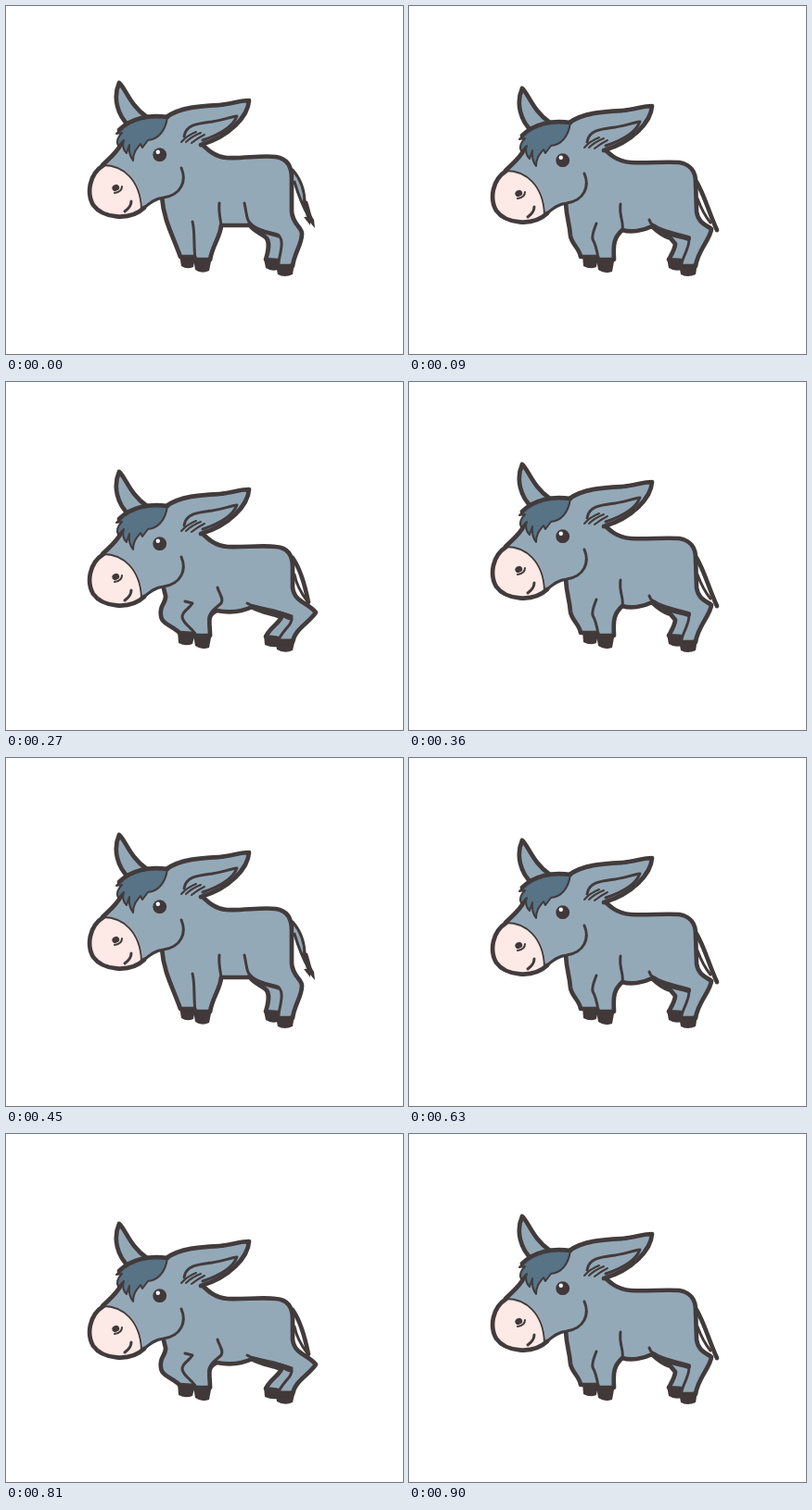
An HTML page for the animation above (0.99 s loop, 428 by 376 pixels).

```html
<!DOCTYPE html>
<html lang="en">
<head>
<meta charset="utf-8">
<title>Donkey</title>
<style>
  html, body { margin: 0; width: 100%; height: 100%; overflow: hidden; background: #fff; }
  svg { display: block; width: 428px; height: 376px; }

  .line { fill: none; stroke: #423b3c; stroke-width: 4.7; stroke-linecap: round; stroke-linejoin: round; }
  .skin { fill: #94a9b8; }
  .thin { stroke-width: 3; }
  .hair { stroke-width: 2; }
  .thick { stroke-width: 6; }
  .dark { fill: #403839; }

  .stand, .dip, .crouch, .head, .open, .shut { animation: 990ms step-end infinite; }
  .stand { animation-name: stand; }
  .dip { animation-name: dip; }
  .crouch { animation-name: crouch; }
  .head { animation-name: nod; }
  .open { animation-name: open; }
  .shut { animation-name: shut; }

  /* Eleven beats of 90 ms */
  @keyframes stand {
    0%, 45.4545%, 100% { visibility: visible; }
    9.0909%, 63.6364% { visibility: hidden; }
  }
  @keyframes dip {
    0%, 18.1818%, 45.4545%, 72.7273%, 100% { visibility: hidden; }
    9.0909%, 36.3636%, 63.6364%, 90.9091% { visibility: visible; }
  }
  @keyframes crouch {
    0%, 36.3636%, 90.9091%, 100% { visibility: hidden; }
    18.1818%, 72.7273% { visibility: visible; }
  }
  @keyframes nod {
    0%, 45.4545%, 100% { transform: translateY(0); }
    9.0909%, 36.3636%, 63.6364%, 90.9091% { transform: translateY(6px); }
    18.1818%, 72.7273% { transform: translateY(14px); }
  }
  @keyframes open {
    0%, 27.2727%, 81.8182%, 100% { visibility: visible; }
    18.1818%, 72.7273% { visibility: hidden; }
  }
  @keyframes shut {
    0%, 27.2727%, 81.8182%, 100% { visibility: hidden; }
    18.1818%, 72.7273% { visibility: visible; }
  }
</style>
</head>
<body>
<svg viewBox="0 0 428 376">
  <g class="stand">
    <path class="line thin skin" d="M309 177C316 185 322 197 322 213L326 227C321 218 316 207 311 190"/>
    <path class="dark" d="M320 209L325 211C328 219 328 225 332 231L333 240L328 234L328 237L321 228L324 228Z"/>
    <path class="line skin" d="M208 146C216 154 224 163 238 164C256 165 275 161 291 163C304 165 308 174 308 186L308 222C309 236 319 239 319 246C319 258 311 266 309 281L293 281L293 275L280 274C283 264 285 255 280 250C275 246 267 243 263 237L232 237C231 250 223 257 220 274L204 274L203 271L188 271C180 248 170 232 168 206"/>
    <path class="line thin" d="M230 213C229 222 231 229 232 237M201 233C204 245 202 258 204 273M257 213C260 226 259 233 266 237C275 245 286 244 294 248C300 254 296 265 293 281"/>
    <path class="line" d="M262 236C270 243 283 245 293 248"/>
    <path class="dark" d="M187 269Q195 273 204 270L202 282Q195 285 189 281ZM202 273Q212 274 222 271L219 286Q211 290 204 285ZM278 273Q287 275 294 273L293 285Q286 287 280 283ZM291 280Q301 280 311 278L309 290Q300 294 293 290Z"/>
  </g>

  <g class="dip">
    <path class="line thin" d="M311 208C315 219 320 228 325 234"/>
    <path class="line" d="M310 190C318 203 324 225 332 242"/>
    <path class="line skin" d="M208 152C216 160 224 168 239 169C256 170 275 168 291 169C304 171 309 180 309 190L310 222C312 236 322 237 326 241C325 252 311 264 309 281L293 281L293 275L280 274C284 267 287 262 287 257L282 251C273 248 267 243 262 238C252 243 239 245 230 242C221 250 220 257 221 274L204 274L203 271L185 271C184 262 175 257 174 248C173 234 170 231 169 213"/>
    <path class="line thin" d="M228 214C226 226 232 234 230 242M202 235C199 243 197 247 198 252C202 259 203 266 204 273M259 231C262 242 281 246 302 250C303 261 296 268 293 281"/>
    <path class="line thick" d="M263 238C274 246 290 247 301 251"/>
    <path class="dark" d="M187 269Q195 273 204 270L202 282Q195 285 188 281ZM202 273Q212 274 222 271L219 287Q211 290 204 285ZM278 272Q287 275 295 273L294 285Q286 287 280 283ZM291 279Q301 280 311 278L309 290Q300 294 293 290Z"/>
  </g>

  <g class="crouch">
    <path class="line thin" d="M311 208C313 218 318 228 325 237"/>
    <path class="line" d="M309 190C316 200 322 218 326 238"/>
    <path class="line skin" d="M208 160C216 168 224 177 239 178C256 179 275 176 291 178C304 179 309 187 309 200L309 222C311 238 325 238 334 249C327 260 311 267 309 281L293 281L293 277L280 275C285 265 294 261 297 254C287 250 275 249 265 243C253 249 238 249 227 247C216 252 220 260 220 274L204 274L203 272L187 271C180 264 167 261 167 252C165 241 173 239 172 231L169 219"/>
    <path class="line thin" d="M228 222C230 229 235 234 232 239C224 246 218 250 219 257M193 237L201 239C197 246 190 247 190 254C191 262 202 266 204 273M260 239C272 246 294 247 308 253C310 263 297 268 293 281"/>
    <path class="line thick" d="M266 243C279 247 293 248 305 254"/>
    <path class="dark" d="M185 269Q194 273 204 271L201 283Q194 286 186 282ZM202 273Q212 274 222 271L219 287Q211 290 204 285ZM278 273Q286 275 294 275L292 286Q286 287 279 284ZM290 277Q301 278 312 277L309 290Q300 294 292 289Z"/>
  </g>

  <g class="head">
    <path class="line skin" d="M133 130C120 118 115 99 122 83C129 89 134 108 152 120"/>
    <path class="skin" d="M131 128L174 119C195 103 235 110 262 102C259 122 239 142 208 151L197 170L189 176C195 190 189 204 170 207L147 219L101 180L104 172C112 164 120 158 124 148Z"/>
    <path class="line" d="M124 149C120 158 112 164 104 172M173 120C188 109 211 108 230 107C243 106 252 102 262 102C261 119 241 141 210 150"/>
    <path class="line thin" d="M189 175C195 189 189 204 170 207C161 208 156 212 149 218"/>
    <path class="line thin" d="M192 141C194 128 207 127 222 125C234 123 242 120 249 119C245 129 233 138 212 145"/>
    <path class="line hair" d="M189 147Q195 140 205 136M194 147Q200 141 210 137M200 148Q206 143 214 139"/>
    <path d="M105 172C125 171 147 186 147 220C132 231 103 231 93 214C86 199 91 181 105 172Z" fill="#fde9e6"/>
    <path class="line hair" d="M105 172C126 172 145 188 146 219"/>
    <path class="line" d="M105 172C89 182 87 203 94 215C104 229 133 233 149 218"/>
    <ellipse class="dark" cx="118.3" cy="196.4" rx="4" ry="3.4" transform="rotate(-30 118.3 196.4)"/>
    <path class="line hair" d="M117 202Q125 201 125 195"/>
    <path class="line thin" d="M128 222Q135 217 135 211"/>
    <path class="line hair" fill="#577385" style="fill:#577385" d="M174 120C156 117 132 122 119 138L125 137C120 142 119 147 121 151L127 145C125 151 127 156 130 159L133 150C132 158 134 163 137 167C137 158 141 154 145 149L147 153L153 145C164 144 172 135 174 120Z"/>
    <path class="line" d="M122 134C135 121 155 117 174 120"/>
    <g class="open">
      <circle class="dark" cx="165.7" cy="160.7" r="7.4"/>
      <circle cx="163.8" cy="157.7" r="2.2" fill="#fff"/>
    </g>
    <path class="shut dark" d="M158 168C161 157 169 153 177 157L174 161C168 160 164 163 158 168Z"/>
  </g>
</svg>
</body>
</html>
```
